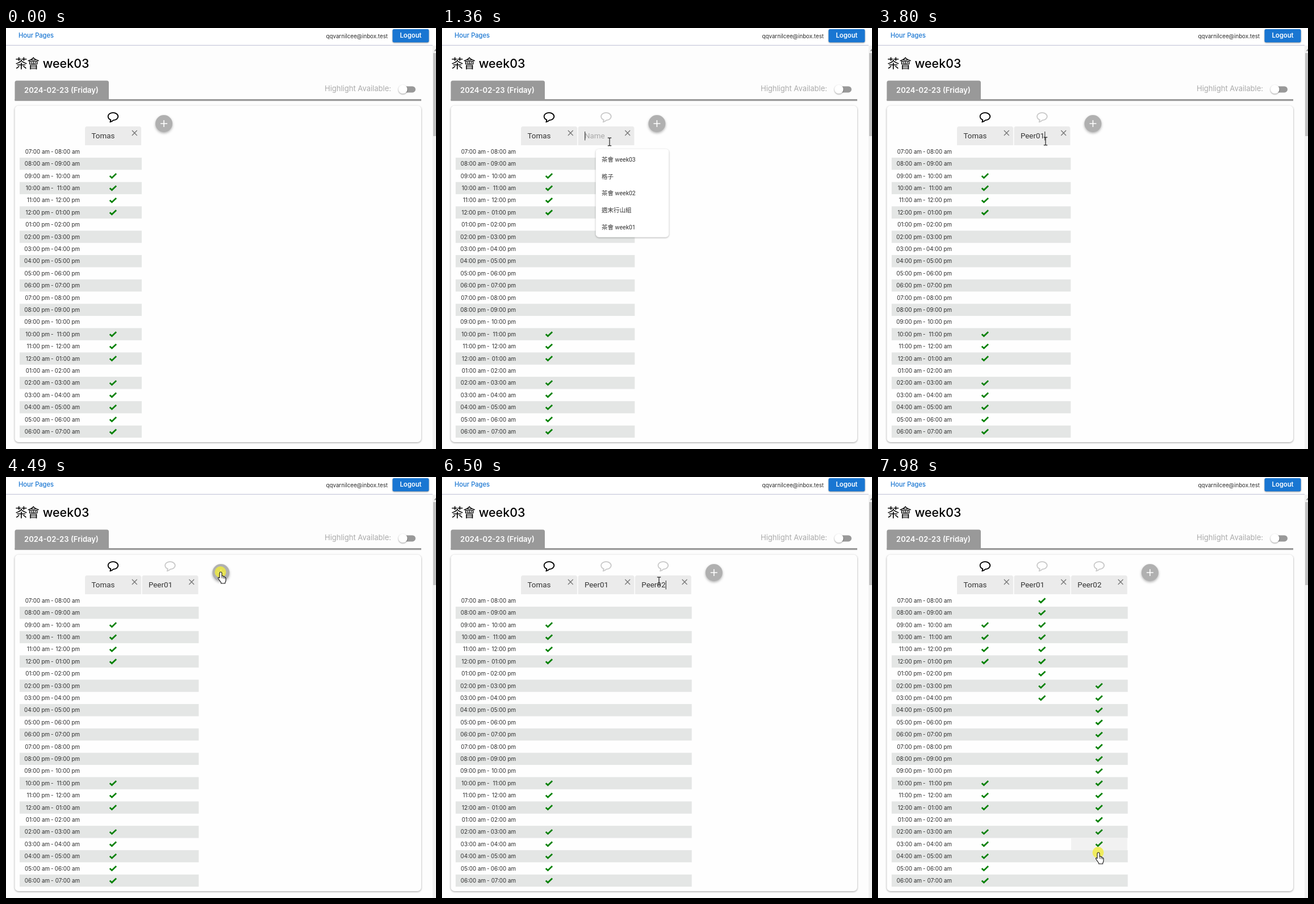
An HTML page for the animation above (8 s loop, 757 px wide and 740 px high).

```html
<!DOCTYPE html>
<html lang="en">
<head>
<meta charset="utf-8">
<title>Weekly availability</title>
<style>
  html, body { margin: 0; width: 100%; height: 100%; overflow: hidden; background: #fdfdfd; }
  svg { display: block; width: 757px; height: 740px; }
  text { font-family: Inter, "Noto Sans CJK TC", "Noto Sans CJK JP", "Noto Sans CJK", sans-serif; fill: #2b2b2b; white-space: pre; }
  .slot { font-size: 9.8px; }
  .field { font: 13.38px Roboto, sans-serif; fill: #333; }
  .hint { fill: #a9a9a9; }
  .option { font-family: Roboto, "Noto Sans CJK TC", "Noto Sans CJK JP", "Noto Sans CJK", sans-serif; font-size: 10.5px; fill: #333; }
  .end { text-anchor: end; }
  .card { fill: #fefefe; filter: drop-shadow(0 1px 1.5px rgba(0,0,0,.38)); }
  .popup { fill: #fff; filter: drop-shadow(0 1px 1.5px rgba(0,0,0,.3)); }
  .add { fill: #b0b0b0; filter: drop-shadow(0 2px 2px rgba(0,0,0,.3)); }
  .raised { filter: drop-shadow(0 1px 1px rgba(0,0,0,.4)); }
  .line { fill: none; }
  .pointer { fill: #fff; stroke: #111; stroke-width: 1.1; stroke-linejoin: round; }
</style>
</head>
<body>
<svg viewBox="0 0 757 740" xmlns="http://www.w3.org/2000/svg">
  <rect width="757" height="740" fill="#fdfdfd"/>
  <rect width="757" height="30" fill="#fff"/>
  <rect y="29.8" width="751" height="1.3" fill="#c9cbdd"/>
  <text x="22" y="17.2" font-size="11.2" font-weight="500" style="fill:#1976d2">Hour Pages</text>
  <text class="end" x="672" y="18" font-size="9.75">qqvarnilcee@inbox.test</text>
  <rect class="raised" x="680.5" y="2" width="64" height="23.3" rx="2.7" fill="#1976d2"/>
  <text x="712.5" y="17.4" font-size="11.3" font-weight="600" text-anchor="middle" style="fill:#fff">Logout</text>

  <rect x="751" y="31" width="6" height="709" fill="#f1f1f1"/>
  <path d="M753.5 40.5l3.5-4v4z" fill="#8a8a8a"/>
  <rect x="752" y="44" width="5" height="146" fill="#c1c1c1"/>

  <text x="16.2" y="70" font-size="21.4" font-weight="500" style="fill:#000">茶會 week03</text>
  <path d="M15.5 127V96a3.5 3.5 0 0 1 3.5-3.5H177.5a3.5 3.5 0 0 1 3.5 3.5V127z" fill="#999"/>
  <rect x="15.5" y="125" width="715.5" height="3.2" fill="#999"/>
  <text x="32" y="114" font-size="13.1" font-weight="600" style="fill:#fff">2024-02-23 (Friday)</text>
  <text x="561" y="111.2" font-size="13" style="fill:#aaa">Highlight Available:</text>
  <rect x="697" y="102.4" width="24" height="11" rx="5.5" fill="#999"/>
  <circle class="raised" cx="698.7" cy="107.8" r="7.8" fill="#fff"/>
  <rect class="card" x="15.5" y="136.5" width="715.5" height="591.5" rx="6.5"/>

  <g id="labels"></g>
  <g id="scene"></g>
</svg>
<script>
const LOOP = 8000;
const TOP = 206.5, ROW = 21.4, ROWS = 24;
const LEFT = 139.1, COL = 100.4, CELL = 98.9;
const CARET_HALF = 540;
const JOINED = [0, 850, 4520];        // when each column appears
const DRAGS = [                       // ticking cells by dragging
  { col: 1, from: 6720, to: 7350, row: 0 },
  { col: 2, from: 7540, to: LOOP, row: 7 }
];
const CLICKS = [[780, 930], [1240, 1330], [4440, 4600], [4840, 4920]];
const FIELDS = [null,
  { focus: 1320, blur: 4440, keys: [[1960, "P"], [2040, "Pe"], [2130, "Pee"], [2250, "Peer"],
    [2430, "Peer1"], [2970, "Peer"], [3190, "Peer0"], [3310, "Peer01"]] },
  { focus: 4900, blur: 6720, keys: [[5600, "P"], [5660, "Pe"], [5720, "Pee"], [5780, "Peer"], [6000, "Peer02"]] }
];
const OPTIONS = ["茶會 week03", "格子", "茶會 week02", "週末行山組", "茶會 week01"];
// time, x, y, eased
const PATH = [
  [160, 662, 300], [720, 279, 167, 1], [1010, 279, 167], [1220, 295, 200, 1],
  [3790, 295, 200], [3800, 295, 199], [4330, 378, 167, 1], [4660, 378, 167],
  [4830, 382, 183, 1], [6500, 382, 183], [6720, 286, 214, 1], [7180, 282, 371],
  [7290, 281, 380], [7410, 281, 380], [7540, 389, 366, 1], [7980, 388, 660]
];

const measure = document.createElement("canvas").getContext("2d");
measure.font = "13.38px Roboto, sans-serif";

const within = (t, [a, b]) => t >= a && t < b;
const colX = c => LEFT + c * COL;
const rowY = r => TOP + r * ROW;
const range = n => [...Array(n).keys()];
const at = (x, y, body) => `<g transform="translate(${x} ${y})">${body}</g>`;
const rect = (x, y, w, h, fill) => `<rect x="${x}" y="${y}" width="${w}" height="${h}" fill="${fill}"/>`;
const text = (x, y, cls, s) => `<text x="${x}" y="${y}" class="${cls}">${s}</text>`;
const stroke = (d, color, width) => `<path class="line" d="${d}" stroke="${color}" stroke-width="${width}"/>`;

function pointerAt(t) {
  if (t < PATH[0][0]) return null;
  const i = PATH.findIndex(p => p[0] > t);
  if (i < 0) return PATH.at(-1).slice(1, 3);
  const [t0, x0, y0] = PATH[i - 1], [t1, x1, y1, eased] = PATH[i];
  let k = (t - t0) / (t1 - t0);
  if (eased) k = k * k * (3 - 2 * k);
  return [x0 + (x1 - x0) * k, y0 + (y1 - y0) * k];
}

function cellAt(t, count) {
  const p = pointerAt(t - 25);
  if (!p) return null;
  const col = Math.floor((p[0] - LEFT) / COL), row = Math.floor((p[1] - TOP) / ROW);
  return col >= 0 && col < count && row >= 0 && row < ROWS ? { col, row } : null;
}

function clockLabel(hour) {
  const h = hour % 24;
  return `${String(h % 12 || 12).padStart(2, "0")}:00 ${h < 12 ? "am" : "pm"}`;
}

function isTicked(col, row, t) {
  if (col === 0) return (row > 1 && row < 6) || (row > 14 && row < 18) || row > 18;
  const drag = DRAGS[col - 1];
  if (t < drag.from || row < drag.row) return false;
  const [, y] = pointerAt(Math.min(t, drag.to) - 25);
  return row <= Math.max(drag.row, Math.floor((y - TOP) / ROW));
}

function drawColumn(c, t) {
  const x = colX(c), field = FIELDS[c];
  let out = at(x + 49.4, 155.5, stroke("M-5 9.6L-4.2 5.8A8.8 6.6 0 1 1 .5 6.6Q-2 9-5 9.6z", c ? "#cacaca" : "#000", 1.8));
  out += `<path d="M${x} 206V176.5a3.5 3.5 0 0 1 3.5-3.5h${CELL - 7}a3.5 3.5 0 0 1 3.5 3.5V206z" fill="#ebebeb"/>`;
  out += at(x + 87.2, 184.5, stroke("M-4.4-4.4L4.4 4.4M4.4-4.4L-4.4 4.4", "#777", 1.35));
  if (field) {
    const last = field.keys.filter(k => k[0] <= t).at(-1);
    const value = last ? last[1] : "";
    out += text(x + 11.4, 194, value ? "field" : "field hint", value || "Name");
    const since = t - (last ? last[0] : field.focus);
    if (within(t, [field.focus, field.blur]) && since % (2 * CARET_HALF) < CARET_HALF)
      out += rect(x + 11.7 + measure.measureText(value).width, 182, 1, 15.5, "#222");
  } else out += text(x + 11.4, 194, "field", "Tomas");
  for (const r of range(ROWS))
    if (isTicked(c, r, t))
      out += at(x + 49.3, rowY(r + .5), stroke("M-5.7 0L-2 3.4L5.7-3.9", "#008000", 2.7));
  return out;
}

function drawPopup(c, t) {
  const field = FIELDS[c];
  if (!within(t, [field.focus + 30, field.keys[0][0]])) return "";
  const x = colX(c) + 31.2;
  return `<rect class="popup" x="${x}" y="212.7" width="128.7" height="155" rx="5.5"/>` +
    OPTIONS.map((s, i) => text(x + 10.3, 235 + i * 29.7, "option", s)).join("");
}

function drawPointer(t, count, addX) {
  const p = pointerAt(t);
  if (!p) return "";
  const [x, y] = p;
  const inColumns = x > LEFT && x < colX(count);
  const pressed = CLICKS.some(c => within(t, c)) || DRAGS.some(d => within(t, [d.from, d.to]));
  let shape = `<path class="pointer" d="M0 0v16l3.7-3.6 2.4 5.6 2.4-1-2.4-5.5h5.2z"/>`;
  if (inColumns && y > 173 && y < 206)
    shape = stroke("M-3.2-6.8H-.8L0-6L.8-6.8H3.2M0-6V6M-3.2 6.8H-.8L0 6L.8 6.8H3.2", "#222", 1.2);
  else if ((inColumns && y >= 206) || Math.hypot(x - addX, y - 168) < 15)
    shape = `<path class="pointer" d="M-2 2a1.9 1.9 0 0 1 4 0v5q2.4-.8 2.6 1q2.4-.6 2.4 1.2q2-.2 2 2v3.5q0 2-1.3 3.8v1.5h-7v-1.5q-2-2.5-5-7q-.8-1.8 1-2q.6 0 1.3 1z"/>` +
      stroke("M2 7v4M4.6 8.5v3M7 9.5v2.5", "#111", .8);
  const glow = pressed ? `<circle cx="-.5" r="10" fill="#f1ec3c" opacity=".8"/>` : "";
  return at(x, y, glow + shape);
}

function render(t) {
  const count = JOINED.filter(j => t >= j).length;
  const addX = 177.6 + count * COL;
  const hover = cellAt(t, count);
  let out = "";
  for (let r = 1; r < ROWS; r += 2) out += rect(24, rowY(r), colX(count) - 24.6, ROW, "#e4e6e5");
  if (hover) out += rect(colX(hover.col), rowY(hover.row), CELL, ROW, hover.row % 2 ? "#d7d7d7" : "#f1f1f1");
  for (const r of range(ROWS)) {
    const y = rowY(r + .5) + 3.5;
    out += text(77, y, "slot end", clockLabel(r + 7)) + text(79, y, "slot", "-") + text(130, y, "slot end", clockLabel(r + 8));
  }
  for (const c of range(count)) out += drawColumn(c, t);
  out += `<circle class="add" cx="${addX}" cy="168" r="15"/>` +
    at(addX, 168, stroke("M-6 0H6M0-6V6", "#fff", 1.6));
  out += drawPopup(1, t) + drawPopup(2, t) + drawPointer(t, count, addX);
  document.getElementById("scene").innerHTML = out;
}

const start = performance.now();
function tick() {
  render((performance.now() - start) % LOOP);
  requestAnimationFrame(tick);
}
tick();
</script>
</body>
</html>
```
